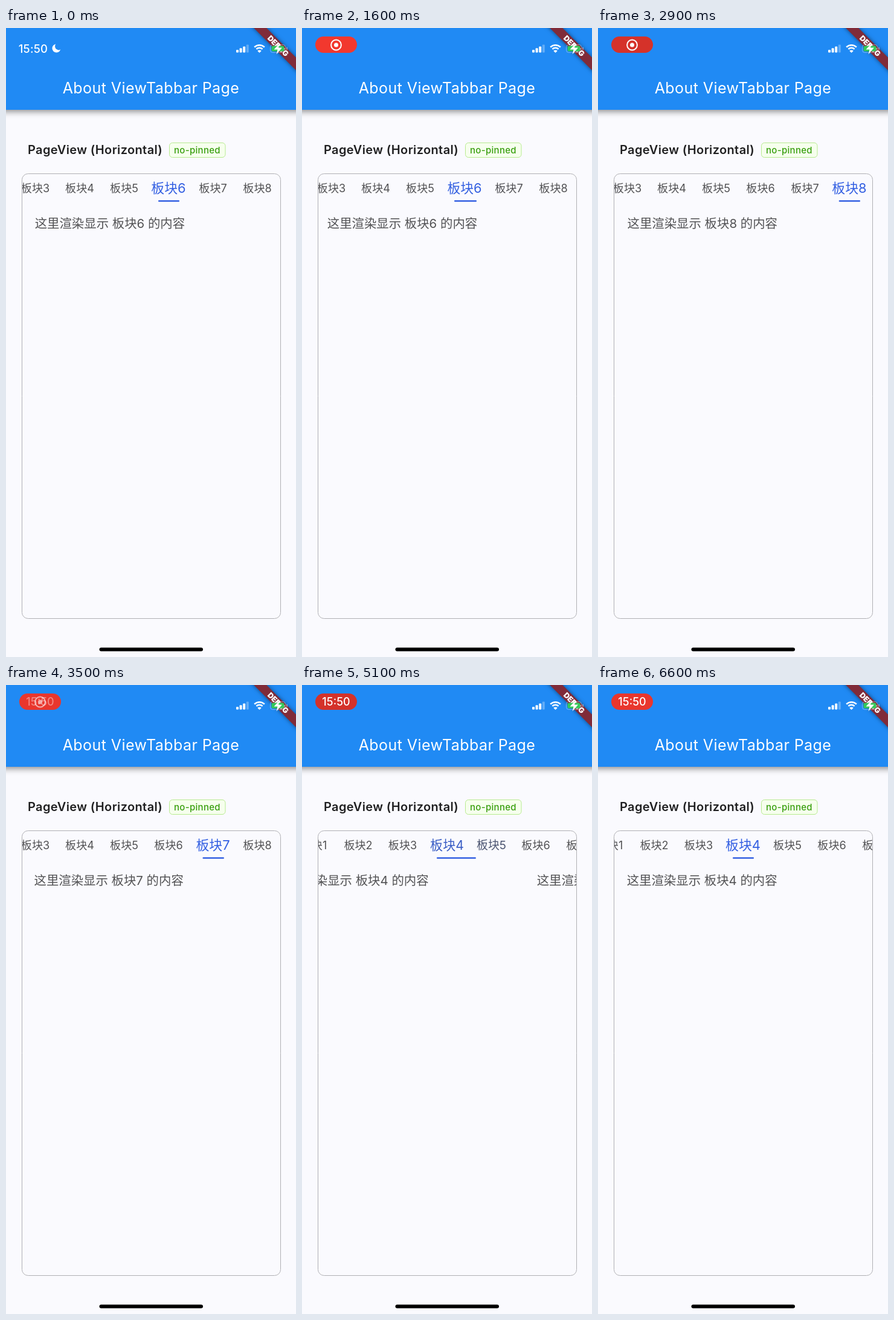
An HTML page with a canvas that plays this animation: 480 px wide and 1038 px high, repeating every 6700 ms.

```html
<!DOCTYPE html>
<html lang="zh">
<head>
<meta charset="utf-8">
<title>Tab bar demo</title>
<style>
  html, body { margin: 0; width: 100%; height: 100%; overflow: hidden; background: #fafafe; }
  canvas { display: block; width: 480px; height: 1038px; }
</style>
</head>
<body>
<canvas id="stage"></canvas>
<script>
const W = 480, H = 1038, LOOP = 6700;
const UI = 'Inter, "Noto Sans CJK SC", "Noto Sans CJK", sans-serif';
const BG = '#fafafe', BLUE = '#208af4', WHITE = '#fff';
const INK = [82, 82, 84], ACCENT = [52, 96, 226];
const PITCH = 73.5, PAGE_W = 428, TABS = 8;
const card = { x: 26.5, y: 240.5, w: 428, h: 734, r: 10 };

// Page swipes: start, duration, destination tab
const swipes = [
  [1500, 667, 7], [2350, 598, 8], [3000, 550, 7],
  [3600, 575, 6], [4250, 450, 5], [4700, 637, 4]
];

const canvas = document.getElementById('stage');
const ctx = canvas.getContext('2d');
const dpr = window.devicePixelRatio || 1;
canvas.width = W * dpr;
canvas.height = H * dpr;

const clamp = (v, a = 0, b = 1) => Math.min(b, Math.max(a, v));
const mix = (a, b, k) => a + (b - a) * k;
const ease = u => u < 0.5 ? 4 * u ** 3 : 1 - 4 * (1 - u) ** 3;
const rgb = c => `rgb(${c.map(Math.round)})`;
const blend = (a, b, k) => rgb(a.map((v, i) => mix(v, b[i], k)));

function box(x, y, w, h, r, fill, stroke, line = 1) {
  ctx.beginPath();
  ctx.roundRect(x, y, w, h, r);
  if (fill) { ctx.fillStyle = fill; ctx.fill(); }
  if (stroke) { ctx.strokeStyle = stroke; ctx.lineWidth = line; ctx.stroke(); }
}

function dot(x, y, r, color) {
  ctx.beginPath();
  ctx.arc(x, y, r, 0, Math.PI * 2);
  ctx.fillStyle = color;
  ctx.fill();
}

function text(str, x, y, size, color, { weight = 400, align = 'left', spacing = 0 } = {}) {
  ctx.font = `${weight} ${size}px ${UI}`;
  ctx.textAlign = align;
  ctx.letterSpacing = spacing + 'px';
  ctx.fillStyle = color;
  ctx.fillText(str, x, y);
}

const tabHome = i => 269 + (i - 6) * PITCH;
const tabShift = i => Math.max(0, 240 - tabHome(i));

function pose(t) {
  let page = 6, shift = tabShift(6);
  for (const [start, dur, to] of swipes) {
    if (t < start) break;
    page = mix(page, to, ease(clamp((t - start) / dur)));
    shift = mix(shift, tabShift(to), ease(clamp((t - start) / 300)));
  }
  return { page, shift };
}

function header() {
  ctx.save();
  ctx.shadowColor = 'rgba(0,0,0,.45)';
  ctx.shadowBlur = 10 * dpr;
  ctx.shadowOffsetY = 3 * dpr;
  ctx.fillStyle = BLUE;
  ctx.fillRect(-20, -20, W + 40, 155);
  ctx.restore();
  text('About ViewTabbar Page', 93.7, 108, 25, WHITE, { spacing: 0.42 });
}

function banner() {
  ctx.save();
  ctx.translate(W, 0);
  ctx.rotate(Math.PI / 4);
  ctx.shadowColor = 'rgba(0,0,0,.5)';
  ctx.shadowBlur = 7 * dpr;
  ctx.fillStyle = '#802b39';
  ctx.fillRect(-60, 34.5, 120, 14.8);
  ctx.shadowColor = 'transparent';
  text('DEBUG', 0, 46.3, 12.4, WHITE, { weight: 900, align: 'center' });
  ctx.restore();
}

function clock(t) {
  const pill = clamp((t - 450) / 200);
  if (pill < 1) {
    ctx.globalAlpha = 1 - pill;
    text('15:50', 20.7, 40.5, 18.5, WHITE, { weight: 500, spacing: 0.2 });
    dot(83.5, 33.5, 7, WHITE);
    dot(87.3, 30.2, 6.2, BLUE);
  }
  if (pill > 0) {
    ctx.globalAlpha = pill;
    const glow = 0.5 - 0.5 * Math.cos((t - 950) / 2050 * Math.PI * 2);
    box(22, 14, 69, 27, 13.5, blend([212, 50, 42], [255, 59, 48], glow));
    const time = clamp((t - 3400) / 250);
    ctx.globalAlpha = pill * (1 - time);
    ctx.beginPath();
    ctx.arc(56.5, 28, 8.4, 0, Math.PI * 2);
    ctx.strokeStyle = WHITE;
    ctx.lineWidth = 2;
    ctx.stroke();
    dot(56.5, 28, 3.5, WHITE);
    ctx.globalAlpha = pill * time;
    text('15:50', 56.5, 34, 18, WHITE, { weight: 500, align: 'center' });
  }
  ctx.globalAlpha = 1;
}

function statusIcons() {
  for (let i = 0; i < 4; i++) {
    const h = 4.5 + i * 2.8;
    box(381 + i * 5.6, 40.5 - h, 4, h, 1, i < 3 ? WHITE : 'rgba(255,255,255,.3)');
  }

  // Wi-Fi fan
  const a = Math.PI * 0.25, up = -Math.PI / 2;
  ctx.strokeStyle = WHITE;
  ctx.lineWidth = 2.6;
  for (const r of [7.2, 11.8]) {
    ctx.beginPath();
    ctx.arc(419.5, 40, r, up - a, up + a);
    ctx.stroke();
  }
  ctx.beginPath();
  ctx.moveTo(419.5, 41);
  ctx.arc(419.5, 41, 4.6, up - a, up + a);
  ctx.fillStyle = WHITE;
  ctx.fill();

  // Charging battery
  box(437.5, 27.5, 25, 13, 4, null, 'rgba(255,255,255,.4)');
  box(464, 31.5, 1.8, 5, 1, 'rgba(255,255,255,.45)');
  box(439.5, 29.5, 21, 9, 2.5, '#34c759');
  ctx.beginPath();
  [[453, 25], [443.5, 35.5], [449.5, 35.5], [447.5, 43.5], [457, 32.5], [451, 32.5]]
    .forEach(([x, y]) => ctx.lineTo(x, y));
  ctx.closePath();
  ctx.fillStyle = WHITE;
  ctx.fill();
}

function heading() {
  text('PageView (Horizontal)', 36, 208, 20, '#1f1f20', { weight: 600, spacing: 0.36 });
  box(270.5, 189.5, 92.5, 24, 5, '#f6ffed', '#b7eb8f');
  text('no-pinned', 278, 206.5, 15, '#389e0d', { weight: 500, spacing: 0.3 });
}

function tabView({ page, shift }) {
  ctx.save();
  ctx.beginPath();
  ctx.roundRect(card.x, card.y, card.w, card.h, card.r);
  ctx.clip();

  for (let i = 1; i <= TABS; i++) {
    const on = clamp(1 - Math.abs(page - i));
    const size = mix(18.1, 21.9, on);
    text('板块' + i, tabHome(i) + shift, 264 + size * 0.38, size,
      blend(INK, ACCENT, on), { align: 'center' });

    const x = 47.7 + (i - page) * PAGE_W;
    if (x > -W && x < W) {
      text(`这里渲染显示 板块${i} 的内容`, x, 329.7, 20.4, rgb(INK));
    }
  }

  // The leading edge moves first, the trailing edge catches up
  const base = Math.floor(page), f = page - base;
  const mid = tabHome(base) + shift;
  const left = mid - 17 + PITCH * clamp(2 * f - 1);
  const right = mid + 18 + PITCH * clamp(2 * f);
  box(left, 284.2, right - left, 2.5, 1.2, rgb(ACCENT));
  ctx.restore();

  box(card.x, card.y, card.w, card.h, card.r, null, '#b0b0b4');
}

function draw(t) {
  ctx.setTransform(dpr, 0, 0, dpr, 0, 0);
  ctx.fillStyle = BG;
  ctx.fillRect(0, 0, W, H);
  header();
  heading();
  tabView(pose(t));
  banner();
  clock(t);
  statusIcons();
  box(154.5, 1022.5, 171.5, 6, 3, '#000');
}

const began = performance.now();
function tick() {
  draw((performance.now() - began) % LOOP);
  requestAnimationFrame(tick);
}
tick();
</script>
</body>
</html>
```
